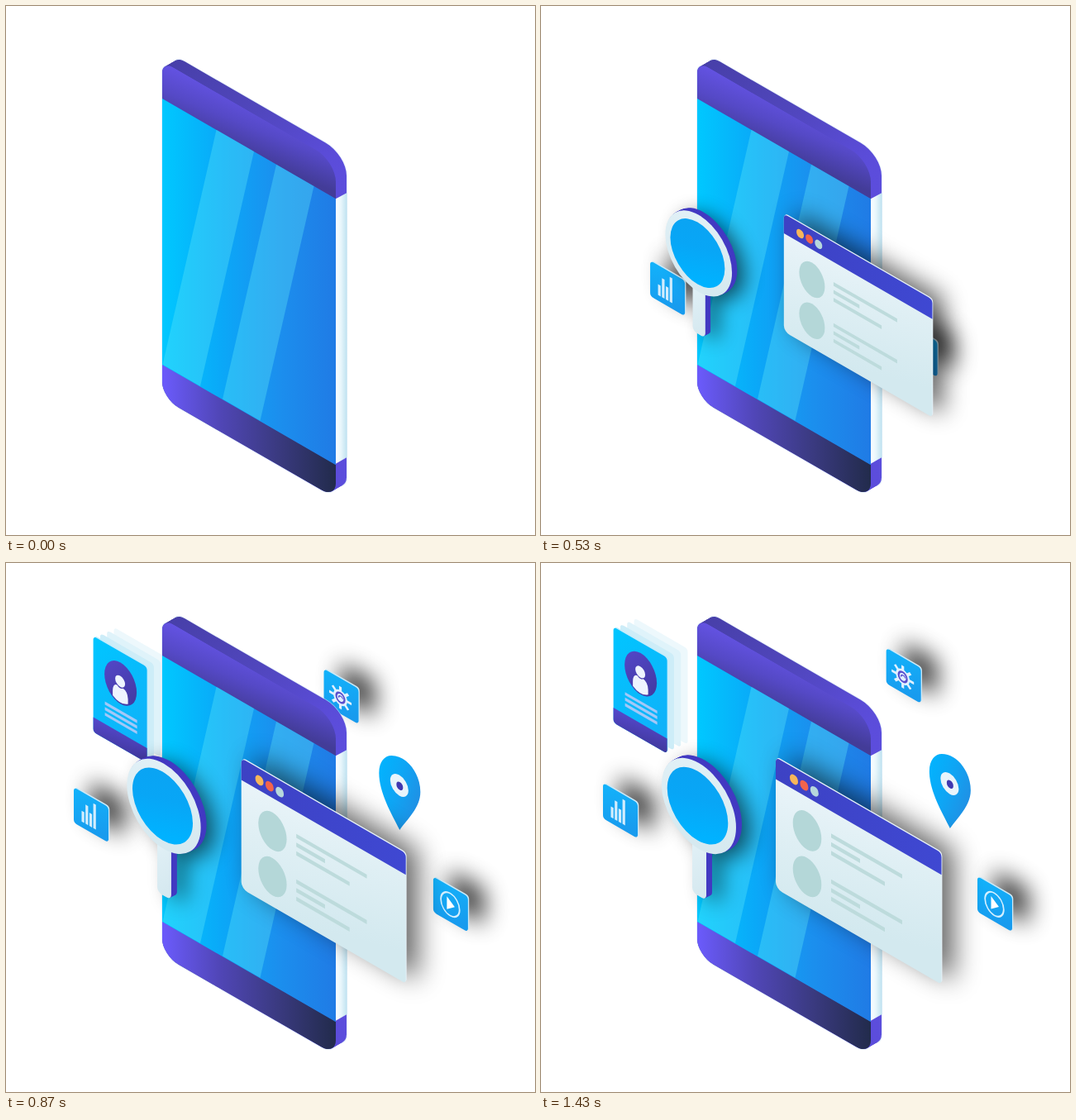
Animation of 640 by 640 pixels, one loop 1960 ms. Source, as an HTML page:

```html
<!DOCTYPE html>
<html lang="en">
<head>
<meta charset="utf-8">
<title>Isometric phone</title>
<style>
html, body { margin: 0; width: 100%; height: 100%; overflow: hidden; background: #fff; }
svg { display: block; width: 100vw; height: 100vh; }
</style>
</head>
<body>
<svg id="stage" viewBox="0 0 640 640"></svg>
<script>
const LOOP = 1960, SLOPE = 0.577, DURATION = 1310;
const stage = document.getElementById('stage');

// Markup helpers: iso() places flat artwork on the slanted plane.
const iso = (x, y, art) => `<g transform="matrix(1 ${SLOPE} 0 1 ${x} ${y})">${art}</g>`;
const shift = (x, y, art) => `<g transform="translate(${x} ${y})">${art}</g>`;
const rect = (x, y, w, h, fill, r = 0) =>
  `<rect x="${x}" y="${y}" width="${w}" height="${h}" rx="${r}" fill="${fill}"/>`;
const oval = (x, y, rx, ry, fill, more = '') =>
  `<ellipse cx="${x}" cy="${y}" rx="${rx}" ry="${ry}" fill="${fill}" ${more}/>`;
const path = (d, fill, more = '') => `<path d="${d}" fill="${fill}" ${more}/>`;
const soft = (blur, opacity, art) => `<g filter="url(#${blur})" opacity="${opacity}">${art}</g>`;
const repeat = (n, make) => Array.from({ length: n }, (_, i) => make(i)).join('');

function grad(id, x2, y2, ...colors) {
  const stops = colors.map((c, i) =>
    `<stop offset="${i / (colors.length - 1)}" stop-color="${c}"/>`).join('');
  return `<linearGradient id="${id}" x1="0" y1="0" x2="${x2}" y2="${y2}">${stops}</linearGradient>`;
}

function blur(id, size) {
  return `<filter id="${id}" x="-100%" y="-100%" width="300%" height="300%">
    <feGaussianBlur stdDeviation="${size}"/></filter>`;
}

function rounded(w, h, tl, tr, br, bl) {
  const arc = (r, x, y) => `A${r} ${r} 0 0 1 ${x} ${y}`;
  return `M${tl} 0H${w - tr}${arc(tr, w, tr)}V${h - br}${arc(br, w - br, h)}` +
    `H${bl}${arc(bl, 0, h - bl)}V${tl}${arc(tl, tl, 0)}Z`;
}

function defs() {
  return `<defs>
    ${grad('screen', 1, 0, '#00c8ff', '#0aa9f8', '#1b8fee', '#207be5')}
    ${grad('top', 0.75, 1, '#6453e4', '#5549c6', '#433c98')}
    ${grad('bottom', 1, 0, '#6b5bfc', '#5046b6', '#3a3a80', '#222b4c')}
    ${grad('rim', 1, 0, '#473fa8', '#5046bc', '#5c4ddc')}
    ${grad('edge', 1, 0, '#ffffff', '#e6f5fb', '#bfe2f0')}
    ${grad('paper', 0.4, 1, '#eef6fb', '#dfeff4', '#d3e9ef')}
    ${grad('bar', 1, 0, '#3d42c4', '#3f48d2')}
    ${grad('glass', 0.3, 1, '#0ba3f2', '#08a6f6', '#00b2ff')}
    ${grad('ring', 0.3, 1, '#e2f1f7', '#d6e9f0')}
    ${grad('tile', 0.6, 1, '#12b3fb', '#189bee')}
    ${grad('pin', 1, 0.6, '#00b5ff', '#0ea6f5', '#2090e4')}
    ${grad('cover', 1, 1, '#00c6ff', '#12aef8')}
    ${grad('badge', 1, 1, '#5548cc', '#40389c')}
    ${blur('far', 14)}${blur('near', 13)}${blur('wide', 16)}
    <clipPath id="face"><path d="${rounded(210, 408, 14, 25, 18, 20)}"/></clipPath>
  </defs>`;
}

function phone() {
  const face = rounded(210, 408, 14, 25, 18, 20);
  const halo = [0, 13].map(i => iso(189 + i, 66.5 - i * 0.58,
    path(face, 'none', 'stroke="#cfe3f6" stroke-width="1.8" opacity=".6"'))).join('');
  const body = repeat(14, i => iso(202 - i, 59 + i * 0.58, path(face, 'url(#rim)')));
  const stripe = x => {
    const y = 45.5, end = 367, lean = 65;
    return path(`M${x} ${y}h45.5L${x + 45.5 - lean} ${end}h-45.5Z`, '#62e8f6', 'opacity=".34"');
  };
  const front = `<g clip-path="url(#face)">
    ${rect(0, 0, 210, 46, 'url(#top)')}
    ${rect(0, 367, 210, 41, 'url(#bottom)')}
    ${rect(0, 45.5, 210, 322, 'url(#screen)')}
    ${stripe(65.5)}${stripe(138)}</g>`;
  return halo + body +
    path('M398.5 233.5L412.5 226V546L398.5 554Z', 'url(#edge)') +
    iso(189, 66.5, front);
}

function tile(icon) {
  const base = fill => rect(0, 0, 42, 43, fill, 4);
  return soft('far', 0.76, iso(20, -8, base('#000'))) +
    iso(1.3, -1, base('#cdeaf8')) +
    iso(0, 0, base('url(#tile)') + icon);
}

function chart() {
  return [13, 23, 16, 30].map((h, i) => rect(9.5 + i * 4.7, 36 - h, 3.2, h, '#d3edfd')).join('');
}

function play() {
  return oval(20.5, 22, 11.3, 13.5, 'none', 'stroke="#d6f0ff" stroke-width="1.8"') +
    path('M16.5 14.5L26 22L16.5 30Z', '#fff');
}

function gear() {
  const tooth = i =>
    `<rect x="-1.6" y="-13.5" width="3.2" height="7" fill="#e2f1ff" transform="rotate(${i * 45})"/>`;
  return shift(20, 23.5, repeat(8, tooth) + oval(0, 0, 8.4, 9, '#e2f1ff') +
    oval(0, 0, 5, 5.6, 'none', 'stroke="#5a4fce" stroke-width="2.2"') +
    path('M-2 1A2.3 2.3 0 0 1 3 0', 'none', 'stroke="#5a4fce" stroke-width="1.3"'));
}

function pin() {
  return path('M25 90C15 70 0 45 0 21C0 7 7 0 15 0C34 0 50 22 50 44C50 63 34 77 25 90Z', 'url(#pin)') +
    iso(24.5, 36, oval(0, 0, 11, 12.5, '#e8f4fb') + oval(0.5, 0.5, 4, 4.7, '#4038b0'));
}

function cards() {
  const sheet = fill => rect(0, 0, 65, 116, fill, 4);
  const back = ['#edf8fc', '#dff3fa', '#cdedf8']
    .map((c, i) => iso((3 - i) * 8.3, (i - 3) * 3.6, sheet(c))).join('');
  const lines = repeat(3, i => rect(14, 71 + i * 6.7, 39, 3.7, '#a3c8f8'));
  return back + iso(1.2, -1, sheet('#c4ecfb')) + iso(0, 0,
    sheet('url(#cover)') +
    path('M0 98H65V112a4 4 0 0 1-4 4H4a4 4 0 0 1-4-4Z', 'url(#badge)') +
    oval(33, 38, 19.5, 25, 'url(#badge)') +
    oval(32.5, 36, 6, 6.6, '#eef4ff') +
    path('M23.5 58V52Q24 43 29 42.5Q32.5 46 36 42.5Q41.5 43 42 52V58Q33 65 23.5 58Z', '#eef4ff') +
    lines);
}

function browser() {
  const sheet = fill => path(rounded(200.5, 159, 5, 5, 4, 8), fill);
  const dots = ['#f7b65a', '#f2644c', '#b7d8dc']
    .map((c, i) => oval(22 + i * 12.4, 14.3, 5, 5.7, c)).join('');
  const row = y => oval(38, y + 11, 17.3, 22.8, '#b4d7d8') +
    [86, 35, 65].map((w, i) => rect(67, y - 2.5 + i * 10.6, w, 5, '#bddbdc')).join('');
  return soft('wide', 0.6, iso(299, 232, sheet('#000'))) +
    iso(284.9, 234, sheet('#e9f3fa')) +
    iso(284, 235, sheet('url(#paper)') +
      path('M0 26.5V5A5 5 0 0 1 5 0H195.5A5 5 0 0 1 200.5 5V26.5Z', 'url(#bar)') +
      dots + row(56) + row(111.5));
}

function lens() {
  const shape = fill => rect(-8, 40, 17, 69, fill, 6) + oval(0, 0, 45, 52, fill);
  const sides = repeat(7, i => iso(198 - i, 290.5 + i * 0.5, shape('#4239c2')));
  return soft('near', 0.6, iso(208, 298, shape('#000'))) + sides +
    iso(191, 294, shape('url(#ring)') + oval(-1.5, 0.5, 36.8, 41.8, 'url(#glass)'));
}

// Sliders rest at (x, y) and come from (dx, dy) away, behind the phone.
const sliders = [
  { art: cards(), x: 87.5, y: 77, dx: 127, dy: 80, start: 448 },
  { art: tile(gear()), x: 418, y: 102.5, dx: -188, dy: 143, start: 488 },
  { art: pin(), x: 470, y: 231, dx: -131, dy: 14, start: 448 },
  { art: tile(chart()), x: 75, y: 266, dx: 224, dy: 165, start: 216 },
  { art: tile(play()), x: 528, y: 379, dx: -355, dy: 11, start: 216 }
];
// Growers scale up around (x, y) in front of the phone.
const growers = [
  { art: browser(), x: 378.5, y: 392 },
  { art: lens(), x: 188.5, y: 346 }
];

const layer = art => `<g class="part">${art}</g>`;
stage.innerHTML = defs() + sliders.map(s => layer(s.art)).join('') + phone() +
  growers.map(g => layer(g.art)).join('');
const nodes = stage.querySelectorAll('.part');
[...sliders, ...growers].forEach((part, i) => { part.node = nodes[i]; });

const left = (t, start) => 1 - Math.min(1, Math.max(0, (t - start) / DURATION));

function draw(t) {
  for (const s of sliders) {
    const u = left(t, s.start);
    const away = Math.min(0.9, u ** 5 + 0.5 * u ** 20);
    s.node.setAttribute('transform', `translate(${s.x + s.dx * away} ${s.y + s.dy * away})`);
  }
  const size = 1 - left(t, 54) ** 5;
  for (const g of growers) {
    g.node.setAttribute('display', size > 0 ? 'inline' : 'none');
    g.node.setAttribute('transform',
      `translate(${g.x} ${g.y}) scale(${size}) translate(${-g.x} ${-g.y})`);
  }
}

const begin = performance.now();
function tick() {
  draw((performance.now() - begin) % LOOP);
  requestAnimationFrame(tick);
}
tick();
</script>
</body>
</html>
```
